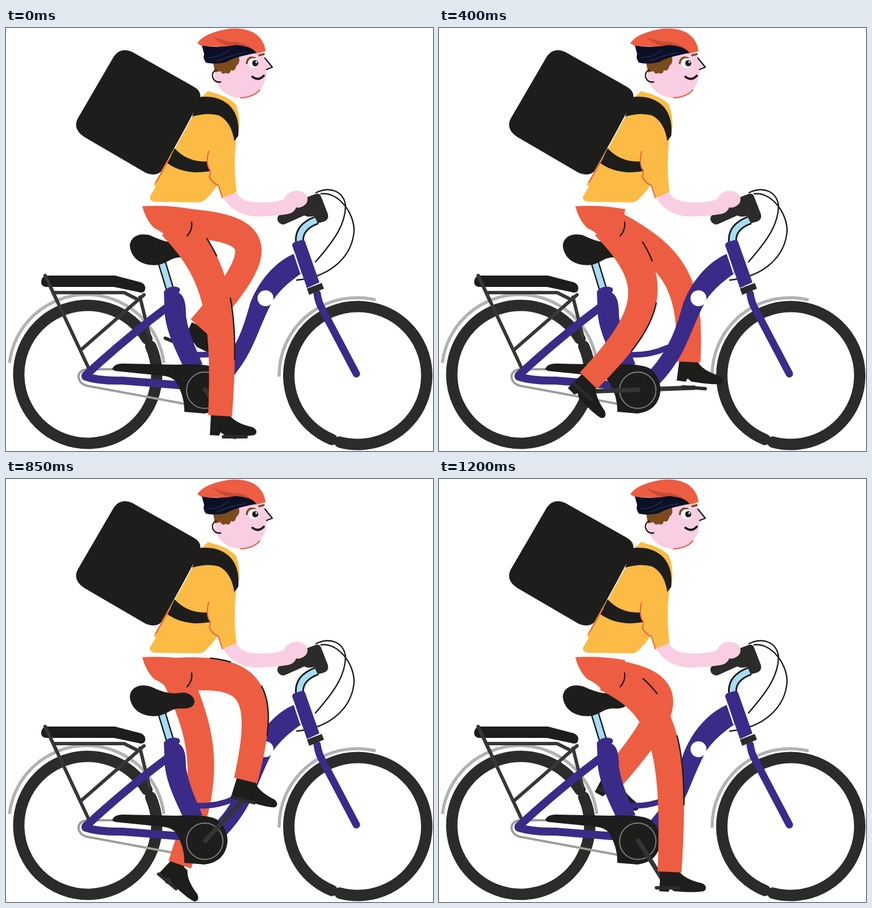
An HTML page that plays this animation: 752 by 745 pixels, repeating every 1.25 s.

```html
<!DOCTYPE html>
<html lang="en">
<head>
<meta charset="utf-8">
<title>Courier on a bike</title>
<style>
html, body { margin: 0; width: 100%; height: 100%; overflow: hidden; background: #fff; }
svg { display: block; width: 100%; height: 100%; }
.line { fill: none; stroke-linecap: round; stroke-linejoin: round; }
.black { fill: #1d1d1b; }
.coal { fill: #2b2b2a; }
.pants { fill: #ed5d42; }
.blue { fill: #3a2b88; }
.skin { fill: #f9cee2; }
.tyre { stroke: #2b2b2a; stroke-width: 20; stroke-dasharray: 353 7; }
.guard { stroke: #b2b2b2; stroke-width: 5.5; stroke-linecap: butt; }
.rack { stroke: #373736; stroke-width: 6; }
.tube { stroke: #3a2b88; stroke-width: 14; }
.ink { stroke: #1d1d1b; stroke-width: 2.4; }
.seam { stroke: #ed5d42; stroke-width: 2; }
.arm { stroke: #343433; stroke-width: 8; }
.pedal { stroke: #2b2b2a; stroke-width: 6; }
</style>
</head>
<body>
<svg viewBox="0 0 752 745">
  <g id="wheels">
    <path class="line guard" d="M6 590A137 137 0 0 1 278 590M481 614A137 137 0 0 1 651 479"/>
    <circle class="line tyre" cx="144" cy="610" r="121.500" pathLength="360" transform="rotate(-24 144 610)"/>
    <circle class="line tyre" cx="619.500" cy="612" r="121.500" pathLength="360" transform="rotate(112 619.500 612)"/>
    <path class="line" stroke="#9d9d9c" stroke-width="4" d="M190 601H142Q126 604 128 617Q131 627 142 630L315 662"/>
  </g>

  <g id="rack">
    <path class="line rack" d="M85 466H208L230 477M243 470L133 566M236 474L253 543M69 436L146 600"/>
    <path class="black" d="M72 436H192L238 448Q247 452 245 461Q243 468 233 465L190 456H70Q61 454 62 446Q63 437 72 436Z"/>
    <path class="line rack" d="M69 436L90 481"/>
  </g>

  <g id="far">
    <path class="line arm"/>
    <path class="shoe black"/>
    <path class="line pedal" d="M-20 0H20"/>
    <path class="leg pants"/>
  </g>

  <g id="frame">
    <path class="line ink" d="M546 290C572 278 594 288 598 312C598 345 580 372 545 412M555 292C585 288 613 325 613 357C610 400 575 438 512 444"/>
    <path class="line tube" d="M140 612Q210 547 285 491M140 614Q165 622 205 621L305 629"/>
    <path class="line tube" style="stroke-width:10" d="M330 575Q370 578 402 563"/>
    <path class="line ink" style="stroke-width:15;stroke-linecap:butt" d="M273 408L290 464"/>
    <path class="line" stroke="#a7dcf5" stroke-width="10" d="M273 408L290 464"/>
    <path class="blue" d="M278 464Q288 452 304 457Q309 461 304 466C315 472 317 487 317 508C322 540 335 565 346 592L314 600C295 560 278 525 279 490Z"/>
    <path class="blue" d="M511 396C474 410 444 447 430 485C420 520 412 545 396 570Q378 600 345 628L385 630Q415 600 433 562C446 535 453 512 470 480Q486 455 522 431Z"/>
    <circle cx="457" cy="476" r="14" fill="#fff"/>
    <path class="line tube" style="stroke-width:13" d="M548 468Q550 484 558 497L617 609"/>
    <path class="line ink" style="stroke-width:16;stroke-linecap:butt" d="M517 376Q515 350 548 338"/>
    <path class="line" style="stroke-linecap:butt" stroke="#a7dcf5" stroke-width="10" d="M517 376Q515 350 548 338"/>
    <path class="blue" d="M508 377L522 373Q526 373 527 377L552 448L530 458L504 383Q504 379 508 377Z"/>
    <path class="line" stroke="#fff" stroke-width="2.500" d="M508 398L519 431"/>
    <path class="coal" d="M530 459L556 449L560 459L534 470Z"/>
    <path class="black" d="M187 601Q190 591 206 591L300 593Q355 590 372 600Q391 615 390 640Q386 674 350 679L314 676Q315 650 300 624Q292 613 272 612L192 604Z"/>
    <circle class="line" cx="350" cy="638" r="32" stroke="#7d7d7c" stroke-width="2"/>
    <path class="black" d="M218 383C220 365 238 360 256 366C270 373 287 379 304 377C320 374 332 382 332 393C330 404 318 405 305 404C290 405 285 413 270 417C240 421 220 406 218 383Z"/>
  </g>

  <g id="near">
    <path class="line arm"/>
    <path class="shoe black"/>
    <path class="line pedal" d="M-20 0H20"/>
    <path class="leg pants"/>
    <path class="line ink crease"/>
  </g>
  <path class="pants" d="M240 314Q285 311 328 319L322 350Q310 370 288 372Q275 358 262 353Q247 340 240 314Z"/>
  <path class="line ink" d="M327 342Q329 355 319 366"/>

  <g id="rider">
    <path class="black" d="M190 50Q202 33 222 42L330 103Q348 113 340 130L280 245Q268 264 246 255L138 192Q117 178 126 160Z"/>
    <path fill="#fbbb45" d="M356 111L365 114Q392 121 405 135Q412 155 411 175L405 200Q400 245 406 289L382 299L373 276Q364 290 350 303Q345 308 335 307L262 306Q251 304 254 296L264 279L260 276L328 155L344 122Z"/>
    <path class="line" stroke="#fff" stroke-width="1.500" d="M328 155L297 212"/>
    <path class="black" d="M338 122Q375 117 396 139Q412 158 409 190L402 199Q397 165 375 154Q355 148 328 156ZM297 212Q320 237 355 235Q354 245 360 252Q315 260 284 238Z"/>
    <path class="line seam" d="M357 217Q352 235 357 247Q362 251 358 262Q363 273 374 277L381 299M289 228L264 272"/>
    <path class="line" stroke="#2b2b2a" stroke-width="20" d="M488 336L530 317"/>
    <path class="coal" d="M530 298L546 292Q553 291 555 297L567 328Q569 338 560 341L549 344L543 331Q525 336 518 322Z"/>
    <path class="skin" d="M382 299L406 289Q412 305 440 307Q470 309 489 302Q495 289 507 287Q523 285 530 296Q533 305 527 311Q519 318 511 316Q507 327 494 328Q470 332 440 332Q402 330 382 299Z"/>

    <path class="skin" d="M372 58C358 90 378 125 418 123C445 120 460 98 459 73L469 69L455 50L448 40Z"/>
    <path fill="#7b4a1d" d="M365 62L410 50Q413 62 406 66Q403 78 396 74Q394 83 387 79Q380 83 378 76L368 78Z"/>
    <circle class="skin" cx="375" cy="86" r="8.500"/>
    <path class="line ink" d="M370 74Q362 77 364 87Q368 97 378 95M456 53L469 69L459 73"/>
    <path class="line" stroke="#7b4a1d" stroke-width="3.500" d="M424 62Q426 49 438 53M446 48L454 46"/>
    <circle cx="436" cy="62" r="9" fill="#fff"/>
    <circle class="black" cx="439" cy="62" r="5.500"/>
    <circle cx="441" cy="60" r="1.800" fill="#fff"/>
    <path class="line ink" style="stroke-width:4" d="M434 86Q445 94 454 84"/>
    <path class="line seam" d="M413 123Q436 122 447 109"/>
    <path class="pants" d="M337 27Q345 13 375 5Q410 -5 436 8Q455 20 457 41L440 45Q400 30 347 33Z"/>
    <path fill="#c94a32" d="M364 15Q385 25 408 25Q428 29 441 43Q415 30 390 31Q377 27 364 15Z"/>
    <path fill="#0a1026" d="M345 31Q375 36 405 30Q433 32 441 44Q402 51 388 60Q368 65 352 61Q346 52 349 46Z"/>
    <path class="line" stroke="#27304e" stroke-width="1.500" d="M356 52Q375 53 393 39M372 58Q395 48 422 43"/>
  </g>
</svg>

<script>
const LOOP = 1250, STEP = 50;
const KEYS = [0, 300, 500, 650, 850, 1100, 1200];
const HUB = { x: 356, y: 602 };
const AXLE = { x: 351, y: 637 };
const CRANK = 98;
const RAD = Math.PI / 180;

// ankle x, ankle y, knee x, knee y, shoe tilt
const NEAR = [
  [377, 683, 369, 475, 0], [289, 669, 341, 490, 46], [269, 565, 381, 447, 31],
  [316, 513, 408, 374, 3], [422, 531, 426, 374, 14], [446, 645, 427, 409, 3],
  [406, 692, 393, 453, 0]
];
const FAR = [
  [341, 527, 426, 385, 22], [414, 546, 418, 392, 8], [434, 643, 403, 480, 2],
  [377, 691, 343, 500, 0], [306, 679, 343, 503, 40], [287, 566, 381, 447, 40],
  [305, 528, 389, 392, 25]
];

const mix = (a, b, k) => a + (b - a) * k;
const mixPt = (a, b, k) => [mix(a[0], b[0], k), mix(a[1], b[1], k)];
const pts = list => list.map(p => p.map(n => n.toFixed(1)).join(" ")).join("L");

// Looping smooth curve through the key values; turn is the gain per loop.
function track(vals, turn = 0) {
  const n = KEYS.length;
  const wrap = i => (i + n) % n;
  const val = i => vals[wrap(i)] + turn * Math.floor(i / n);
  const time = i => KEYS[wrap(i)] + LOOP * Math.floor(i / n);
  const rate = i => (val(i + 1) - val(i)) / (time(i + 1) - time(i));
  const slope = i => {
    const h0 = time(i) - time(i - 1), h1 = time(i + 1) - time(i);
    return (rate(i - 1) * h1 + rate(i) * h0) / (h0 + h1);
  };
  return t => {
    let i = n - 1;
    while (KEYS[i] > t) i--;
    const h = time(i + 1) - time(i), u = (t - time(i)) / h, w = 1 - u;
    return w * w * ((1 + 2 * u) * val(i) + u * h * slope(i)) +
           u * u * ((3 - 2 * u) * val(i + 1) - w * h * slope(i + 1));
  };
}

function makeLeg(id, poses, hip, thigh, phase) {
  const find = s => document.querySelector(`#${id} ${s}`);
  const shoe = find(".shoe"), arm = find(".arm"), pedal = find(".pedal");
  const leg = find(".leg"), crease = find(".crease");
  shoe.setAttribute("d", "M-16 -3L17 -1C26 12 45 17 57 20C66 24 66 31 60 34C40 37 25 35 8 34L1 29L-2 35L-18 34Z");

  let last = -Infinity;
  const angles = poses.map(([x, y]) => {
    let a = Math.atan2(y - HUB.y, x - HUB.x);
    while (a < last) a += 2 * Math.PI;
    return last = a;
  });
  const angle = track(angles, 2 * Math.PI);
  const reach = track(poses.map(p => Math.hypot(p[0] - HUB.x, p[1] - HUB.y)));
  const [kneeX, kneeY, tilt] = [2, 3, 4].map(k => track(poses.map(p => p[k])));

  return t => {
    const a = angle(t), r = reach(t);
    const ankle = [HUB.x + r * Math.cos(a), HUB.y + r * Math.sin(a)];
    const mid = [kneeX(t), kneeY(t)];
    const bend = mid.map((m, k) => (m - 0.2 * (hip[k] + ankle[k])) / 0.6);
    const c1 = mixPt(hip, bend, 0.8), c2 = mixPt(ankle, bend, 0.8);

    // Point on the limb at u, moved sideways to its front (1) or back (-1).
    const edge = (u, side) => {
      const p = mixPt(hip, c1, u), q = mixPt(c1, c2, u), s = mixPt(c2, ankle, u);
      const e = mixPt(p, q, u), f = mixPt(q, s, u), c = mixPt(e, f, u);
      const dx = f[0] - e[0], dy = f[1] - e[1];
      const w = side * mix(thigh, 21, u) / Math.hypot(dx, dy);
      return [c[0] + dy * w, c[1] - dx * w];
    };
    const run = (from, to, side) =>
      Array.from({ length: 33 }, (_, i) => edge(mix(from, to, i / 32), side));

    leg.setAttribute("d", "M" + pts([...run(0, 1, 1), ...run(1, 0, -1)]) + "Z");
    if (crease) crease.setAttribute("d", "M" + pts(run(0.17, 0.28, 1)) + "M" + pts(run(0.52, 0.8, 1)));

    const spin = (58 + 0.3 * t + phase) * RAD;
    const px = AXLE.x + CRANK * Math.cos(spin), py = AXLE.y + CRANK * Math.sin(spin);
    const turn = `rotate(${tilt(t)})`;
    shoe.setAttribute("transform", `translate(${ankle}) ${turn}`);
    pedal.setAttribute("transform", `translate(${px} ${py}) ${turn}`);
    arm.setAttribute("d", `M${AXLE.x} ${AXLE.y}L${px} ${py}`);
  };
}

const legs = [
  makeLeg("near", NEAR, [297, 345], 30, 0),
  makeLeg("far", FAR, [298, 343], 26, 180)
];
const start = performance.now();

function draw(now) {
  const t = Math.floor((Math.max(0, now - start) % LOOP) / STEP) * STEP;
  legs.forEach(pose => pose(t));
  requestAnimationFrame(draw);
}
draw(start);
</script>
</body>
</html>
```
